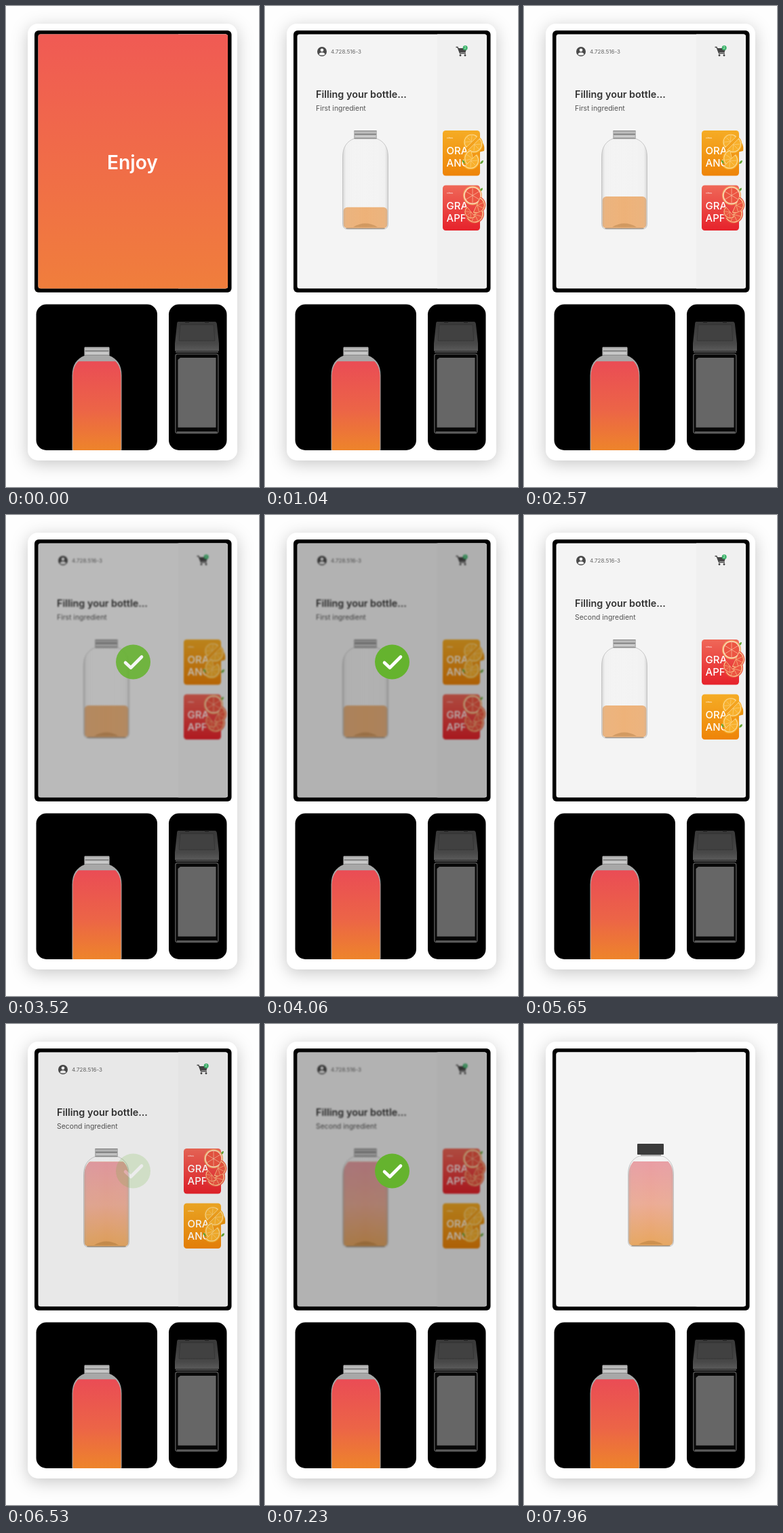
Write an HTML page that moves like this. It is 373x707 px and loops after 8 s.

```html
<!DOCTYPE html>
<html lang="en">
<head>
<meta charset="utf-8">
<title>Bottle filling</title>
<style>
  html, body { margin: 0; width: 100%; height: 100%; overflow: hidden; background: #fefefe; }
  svg { display: block; width: 373px; height: 707px; font-family: Inter, "Open Sans", sans-serif; }
  .card { fill: #fff; filter: drop-shadow(0 5px 12px rgba(0, 0, 0, .22)); }
  .name { font-size: 15px; font-weight: 500; fill: #fff; }
  .tiny { font-size: 3.4px; fill: #fff; }
  .step { font-size: 10.4px; fill: #555; }
</style>
</head>
<body>
<svg viewBox="0 0 373 707">
  <defs>
    <linearGradient id="sunset" x2="0" y2="1"><stop stop-color="#f05a54"/><stop offset="1" stop-color="#f07e3c"/></linearGradient>
    <linearGradient id="juice" x2="0" y2="1"><stop stop-color="#ea4c55"/><stop offset=".5" stop-color="#ec6447"/><stop offset="1" stop-color="#ee8a25"/></linearGradient>
    <linearGradient id="pale" x2="0" y2="1"><stop stop-color="#e8989f"/><stop offset=".5" stop-color="#eba78f"/><stop offset="1" stop-color="#e6a052"/></linearGradient>
    <linearGradient id="orangeBg" x2="0" y2="1"><stop stop-color="#f5ac25"/><stop offset="1" stop-color="#ee8408"/></linearGradient>
    <linearGradient id="redBg" x2="0" y2="1"><stop stop-color="#ef6858"/><stop offset="1" stop-color="#e6222b"/></linearGradient>
    <linearGradient id="metal" x2="0" y2="1"><stop stop-color="#383838"/><stop offset=".75" stop-color="#484848"/><stop offset="1" stop-color="#5a5a5a"/></linearGradient>
    <linearGradient id="glass"><stop stop-color="#999" stop-opacity=".4"/><stop offset=".08" stop-color="#ddd" stop-opacity=".12"/><stop offset=".5" stop-color="#fff" stop-opacity=".05"/><stop offset=".92" stop-color="#ddd" stop-opacity=".12"/><stop offset="1" stop-color="#999" stop-opacity=".4"/></linearGradient>

    <path id="body" d="M-17 195C-27 199-33.5 207-33.5 222V320Q-33.5 328-26 328H26Q33.5 328 33.5 320V222C33.5 207 27 199 17 195Z"/>
    <clipPath id="inside"><use href="#body" transform="translate(0 7) scale(.973 .976)"/></clipPath>
    <clipPath id="screen"><rect x="47.5" y="41.5" width="279.5" height="373.700" rx="3.500"/></clipPath>
    <clipPath id="tray"><rect x="44.500" y="438.500" width="178.500" height="214.500" rx="15"/></clipPath>

    <g id="neck">
      <rect x="-17" y="183" width="34" height="12.500" rx="1.500" fill="#bbb"/>
      <path d="M-16.500 183.700H16.500M-16.500 194.500H16.500" stroke="#8a8a8a" stroke-width="1.200"/>
      <path d="M-16 188.500H16" stroke="#777" stroke-width="1.400"/>
      <path d="M-15 191.500H15" stroke="#ddd"/>
    </g>
    <g id="bottle">
      <use href="#body" fill="url(#glass)" stroke="#bdbdbd" stroke-width=".8"/>
      <path d="M-28 327H28" stroke="#777" stroke-width="1.400" stroke-linecap="round" opacity=".6"/>
      <path d="M-18 325Q0 314 18 325Z" fill="#8a5a20" opacity=".28"/>
    </g>

    <!-- half slice of citrus, flat side up -->
    <g id="half">
      <path d="M-14 0A14 14 0 0 0 14 0Z" fill="currentColor"/>
      <path d="M-12.600 0A12.600 12.600 0 0 0 12.600 0Z" fill="#fbdc9c"/>
      <path d="M-11.300 .6A11.300 11 0 0 0 11.300 .6Z" fill="currentColor"/>
      <path d="M0 1V11M0 1L-8 8M0 1L8 8" stroke="#fbdc9c" stroke-width=".5"/>
    </g>
    <path id="leaf" d="M0 0Q1-5 5-5Q5 0 0 0Z" fill="#62a531"/>

    <g id="orange">
      <rect x="262" y="183" width="55" height="66.500" rx="4.500" fill="url(#orangeBg)"/>
      <text class="tiny" x="268" y="195">citrus</text>
      <text class="name" x="267.500" y="218">ORA</text><text class="name" x="267.500" y="236">ANG</text>
      <g color="#f8b02c">
        <use href="#leaf" transform="translate(295 232) rotate(-80)"/>
        <use href="#leaf" transform="translate(317 232)"/>
        <path d="M313 197Q325 199 323 213L311 216Z" fill="#e8920f"/>
        <use href="#half" transform="translate(305 200) rotate(-225) scale(.9)"/>
        <use href="#half" transform="translate(308 203) rotate(-45) scale(.95)"/>
        <use href="#half" transform="translate(307 224) rotate(75)"/>
        <use href="#half" transform="translate(303 227) rotate(-45) scale(.95)"/>
      </g>
    </g>
    <g id="grape">
      <rect x="262" y="183" width="55" height="66.500" rx="4.500" fill="url(#redBg)"/>
      <text class="tiny" x="268" y="195">citrus</text>
      <text class="name" x="267.500" y="218">GRA</text><text class="name" x="267.500" y="236">APF</text>
      <g color="#ec5542">
        <use href="#leaf" transform="translate(316 192)"/>
        <circle cx="306" cy="198" r="14" fill="#f4a765"/><circle cx="306" cy="198" r="12.800" fill="#fbd9b8"/>
        <circle cx="306" cy="198" r="11.200" fill="#ec5542"/>
        <path d="M306 187V209M296 192L316 204M296 204L316 192" stroke="#fbd9b8" stroke-width=".6"/>
        <use href="#half" transform="translate(312 212) rotate(-65) scale(.95)"/>
        <use href="#half" transform="translate(309 225) rotate(-25)"/>
        <use href="#half" transform="translate(304 222) rotate(50) scale(.75)"/>
      </g>
    </g>
  </defs>

  <rect class="card" x="32" y="26" width="309" height="642" rx="15"/>
  <rect x="42" y="36" width="290.500" height="385" rx="6"/>

  <g clip-path="url(#screen)">
    <rect x="47" y="41" width="281" height="375" fill="#f4f4f4"/>
    <g id="scene">
      <rect x="254" y="30" width="90" height="400" fill="#f0f0f0"/>
      <circle cx="84" cy="67" r="7" fill="#4a4a4a"/>
      <circle cx="84" cy="64.800" r="2.400" fill="#f4f4f4"/><path d="M79.500 71.200Q80 68.300 84 68.300T88.500 71.200Q84 74 79.500 71.200Z" fill="#f4f4f4"/>
      <text x="97" y="70" font-size="8" fill="#666">4.728.516-3</text>
      <path d="M281.500 60.500H284L287.500 69.500H296" fill="none" stroke="#444" stroke-width="1.300"/>
      <path d="M284.500 62H297.500L295.500 68.200H287Z" fill="#444"/>
      <circle cx="288" cy="72.500" r="1.400" fill="#444"/><circle cx="295" cy="72.500" r="1.400" fill="#444"/>
      <circle cx="295.200" cy="61.600" r="3.500" fill="#3db56c"/>
      <text x="293.800" y="63.300" font-size="4.500" fill="#fff">2</text>
      <text x="75" y="135" font-size="14.400" font-weight="600" fill="#333">Filling your bottle...</text>
      <g id="first">
        <text class="step" x="75" y="154">First ingredient</text>
        <use href="#orange"/><use href="#grape" y="80.500"/>
      </g>
      <g id="second">
        <text class="step" x="75" y="154">Second ingredient</text>
        <use href="#grape"/><use href="#orange" y="80.500"/>
      </g>
      <g transform="translate(148)">
        <g clip-path="url(#inside)">
          <rect class="fill" x="-32.500" width="65" height="150" rx="6" fill="#edae72"/>
          <rect class="fill" id="mix" x="-32.500" width="65" height="125" rx="3" fill="url(#pale)"/>
        </g>
        <use href="#bottle"/><use href="#neck"/>
      </g>
    </g>
    <rect id="shade" x="47" y="41" width="281" height="375"/>
    <g id="check">
      <circle cx="187.500" cy="216" r="25.500" fill="#65b32e"/>
      <path d="M176 217L184 224.500L200 208.500" fill="none" stroke="#fff" stroke-width="4.600" stroke-linecap="round" stroke-linejoin="round"/>
    </g>
    <g id="done">
      <rect x="47" y="41" width="281" height="375" fill="#f4f4f4"/>
      <g transform="translate(187 -1)">
        <rect x="-33" y="203" width="66" height="125" fill="url(#pale)" clip-path="url(#inside)"/>
        <use href="#bottle"/>
        <rect x="-15" y="190" width="30" height="5" fill="#aaa"/>
        <rect x="-20" y="177" width="39" height="16" rx="1" fill="#3b3b3b"/>
      </g>
    </g>
    <g id="enjoy">
      <rect x="47" y="41" width="281" height="375" fill="url(#sunset)"/>
      <text x="186.500" y="240" font-size="28.200" font-weight="600" fill="#fff" text-anchor="middle">Enjoy</text>
    </g>
  </g>

  <rect x="44.500" y="438.500" width="178.500" height="214.500" rx="15"/>
  <g clip-path="url(#tray)">
    <g transform="translate(134 501) scale(1.09) translate(0 -183)">
      <use href="#body" fill="#a8a8a8"/>
      <rect x="-34" y="202.500" width="68" height="130" fill="url(#juice)" clip-path="url(#inside)"/>
      <use href="#neck"/>
    </g>
  </g>

  <rect x="240" y="438.500" width="85.500" height="214.500" rx="15"/>
  <path d="M254 464H308Q310.500 464 311 468L314 496V507H249V496L252 468Q252 464 254 464Z" fill="url(#metal)"/>
  <path d="M257 468.500H306L308 492H255Z" fill="#414141" stroke="#333" stroke-width=".8"/>
  <path d="M264 464.500H270M293 464.500H299" stroke="#222" stroke-width="2"/>
  <path d="M250 508.500H313" stroke="#6a6a6a" stroke-width="1.600"/>
  <rect x="249.800" y="511.500" width="63" height="116.500" rx="3" fill="#080808" stroke="#505050" stroke-width="1.500"/>
  <path d="M252 626.500H311" stroke="#666" stroke-width="2"/>
  <path d="M257 517H309.500V619.500H253.500V520Z" fill="#666"/>
</svg>
<script>
  const el = id => document.getElementById(id);
  const fills = document.querySelectorAll('.fill');
  const LOOP = 8000, DISSOLVE = 300, EMPTY = 328, THIRD = 280, FULL = 202.5;

  // Eased progress from 0 to 1, starting at `start`
  const ease = (t, start, length = DISSOLVE) => {
    const p = Math.min(1, Math.max(0, (t - start) / length));
    return p * p * (3 - 2 * p);
  };
  const fade = (id, opacity) => el(id).setAttribute('opacity', opacity);

  function draw(t) {
    const swap = ease(t, 5100);
    const rise1 = ease(t, 720, 520), rise2 = ease(t, 5650, 680);
    const overlay = ease(t, 3290) - ease(t, 4690) + ease(t, 6450);
    const level = EMPTY + (THIRD - EMPTY) * rise1 + (FULL - THIRD) * rise2;

    fade('enjoy', 1 - ease(t, 480));
    fade('first', 1 - swap);
    fade('second', swap);
    fade('mix', rise2);
    fade('shade', .27 * overlay);
    fade('check', overlay);
    fade('done', ease(t, 7650, 290));
    fills.forEach(f => f.setAttribute('y', level));
    el('scene').style.filter = overlay > 0 ? `blur(${overlay}px)` : 'none';
  }

  const begin = performance.now();
  function tick() {
    draw((performance.now() - begin) % LOOP);
    requestAnimationFrame(tick);
  }
  tick();
</script>
</body>
</html>
```
